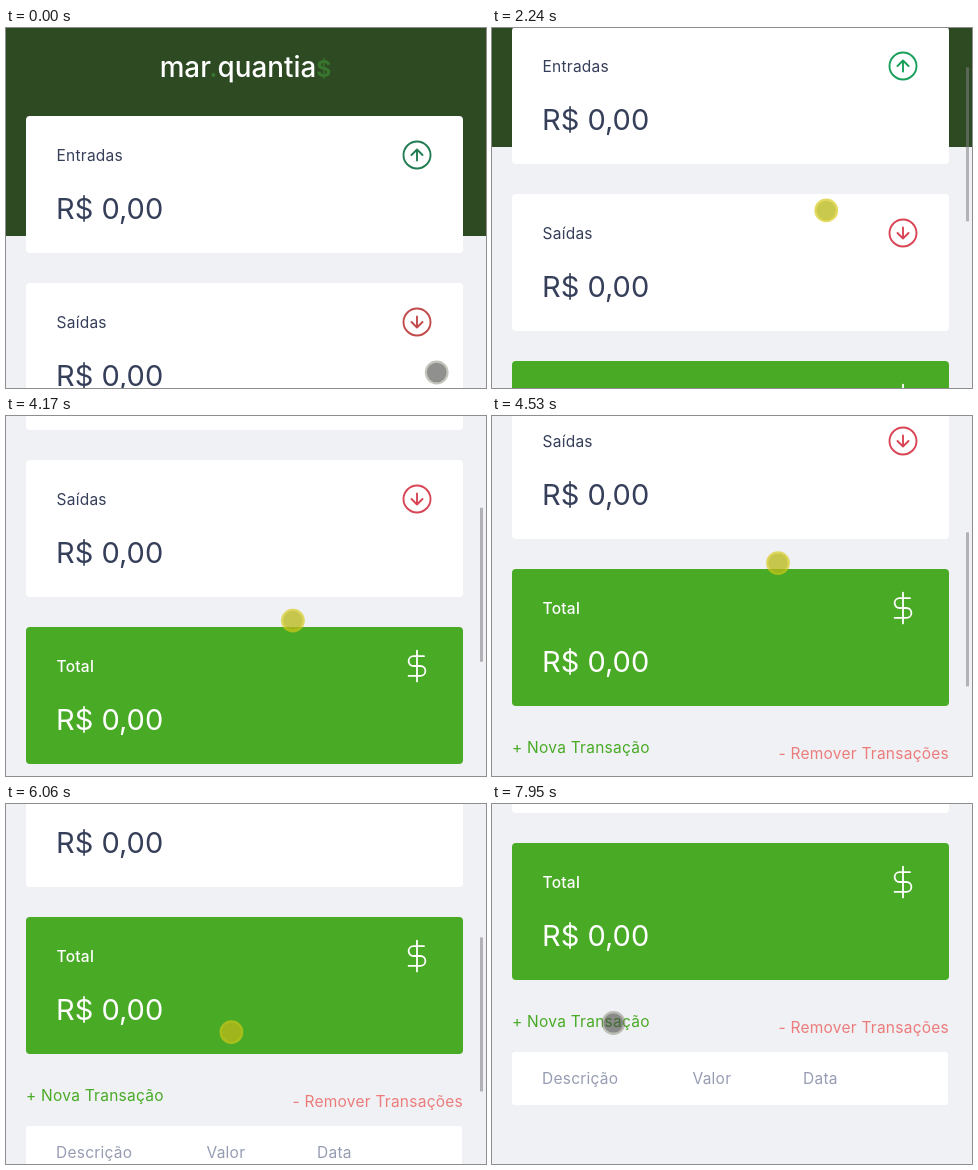
Recreate the animation shown at these times as an HTML page. Size 480 by 360 pixels, loop 8000 ms.

```html
<!DOCTYPE html>
<html lang="pt-BR">
<head>
<meta charset="utf-8">
<style>
  html, body { margin: 0; height: 100%; overflow: hidden; }
  svg {
    display: block; width: 480px; height: 360px; background: #f0f1f4;
    font: 15.5px Inter, sans-serif; letter-spacing: .25px;
    --brand: #419c2a; --in: #189f5a; --out: #d84656;
  }
  svg.muted { --brand: #38752e; --in: #217c52; --out: #c24a4a; }
  .dark { fill: #363f5a; }
  .white { fill: #fff; }
  .amount { font-size: 29px; letter-spacing: 0; }
  .logo { font-size: 27.8px; font-weight: 500; letter-spacing: 0; }
  .logo tspan { fill: var(--brand); }
  .coin { font-size: 23px; font-weight: 700; }
  .icon { fill: none; stroke-width: 1.9; stroke-linecap: round; stroke-linejoin: round; }
  .touch { fill: rgba(60,60,56,.57); }
  .ring { fill: none; stroke: rgba(125,125,108,.45); stroke-width: 2.4; }
  .down .touch { fill: rgba(185,185,25,.77); }
  .down .ring { stroke: rgba(212,200,24,.68); }
</style>
</head>
<body>
<svg id="stage" viewBox="0 0 480 360">
  <g id="page">
    <rect width="480" height="208" fill="#2d4a22"/>
    <text class="logo white" x="239.5" y="49" text-anchor="middle">mar<tspan>.</tspan>quantia<tspan class="coin">$</tspan></text>

    <g transform="translate(20 88)">
      <rect class="white" width="437" height="137" rx="4"/>
      <text class="dark" x="30.5" y="44.5">Entradas</text>
      <text class="dark amount" x="30" y="103">R$ 0,00</text>
      <g class="icon" stroke="var(--in)" transform="translate(391 39)">
        <circle r="13.5"/><path d="M0 5.5V-5.5M-5.5 0L0-5.5L5.5 0"/>
      </g>
    </g>

    <g transform="translate(20 255)">
      <rect class="white" width="437" height="137" rx="4"/>
      <text class="dark" x="30.5" y="44.5">Saídas</text>
      <text class="dark amount" x="30" y="103">R$ 0,00</text>
      <g class="icon" stroke="var(--out)" transform="translate(391 39)">
        <circle r="13.5"/><path d="M0-5.5V5.5M-5.5 0L0 5.5L5.5 0"/>
      </g>
    </g>

    <g transform="translate(20 422)">
      <rect width="437" height="137" rx="4" fill="#49aa26"/>
      <text class="white" x="30.5" y="44.5" font-weight="500">Total</text>
      <text class="white amount" x="30" y="103">R$ 0,00</text>
      <path class="icon" stroke="#fff" style="stroke-width:1.3" transform="translate(374.2 22.2) scale(1.4)"
        d="M12 1V23M17 5H9.5a3.5 3.5 0 0 0 0 7h5a3.5 3.5 0 0 1 0 7H6"/>
    </g>

    <text x="20" y="606" fill="#49aa26">+ Nova Transação</text>
    <text x="457" y="612" fill="#ec7c7c" text-anchor="end">- Remover Transações</text>
    <rect class="white" x="20" y="631" width="436" height="53" rx="3"/>
    <g fill="#969cb3">
      <text x="50" y="663">Descrição</text>
      <text x="200.5" y="663">Valor</text>
      <text x="311" y="663">Data</text>
    </g>
  </g>
  <rect id="thumb" x="474" width="3" height="154" fill="#808084" fill-opacity=".55"/>
  <g id="cursor">
    <circle class="touch" r="9.8"/>
    <circle class="ring" r="10.7"/>
  </g>
</svg>
<script>
  const LOOP = 8000;
  const SLOP = 13;   // finger travel before the page starts to scroll
  const [stage, page, thumb, cursor] =
    ['stage', 'page', 'thumb', 'cursor'].map(id => document.getElementById(id));

  const glide = (start, end, x, y) => ({ start, end, x, y });
  const drag = (...args) => ({ ...glide(...args), pressed: true });
  const moves = [
    glide(20, 21, 374, 304),
    glide(540, 890, 335, 284),
    drag(1120, 2780, 334, 149),
    glide(2790, 3490, 288.5, 307),
    drag(3630, 4540, 286, 147),
    glide(4560, 5240, 217, 247),
    glide(5260, 5410, 225, 281),
    drag(5750, 6450, 226, 154),
    glide(6480, 7210, 216, 246),
    glide(7230, 7650, 140, 203),
    glide(7650, 7950, 121.5, 219)
  ];

  const clamp = v => Math.max(0, Math.min(1, v));
  const ease = u => u * u * (3 - 2 * u);

  // Follow the moves up to time t; a drag scrolls the page by the finger's travel.
  function pose(t) {
    let x = 430.7, y = 344.5, scroll = 0, down = false, bar = 0;
    for (const m of moves) {
      if (t < m.start) break;
      const u = clamp((t - m.start) / (m.end - m.start)), e = ease(u);
      const nextY = y + (m.y - y) * e;
      if (m.pressed) {
        const travel = Math.max(0, y - SLOP - nextY);
        scroll += travel;
        down = u < 1;
        bar = travel ? clamp((m.end + 500 - t) / 250) : 0;
      }
      x += (m.x - x) * e;
      y = nextY;
    }
    return { x, y, scroll, down, bar };
  }

  function draw(now) {
    const t = now % LOOP;
    const { x, y, scroll, down, bar } = pose(t);
    stage.classList.toggle('muted', t < 1080);
    page.setAttribute('transform', `translate(0 ${-Math.round(scroll)})`);
    thumb.setAttribute('y', 1.5 + scroll * .427);
    thumb.setAttribute('opacity', bar);
    cursor.setAttribute('transform', `translate(${x} ${y})`);
    cursor.classList.toggle('down', down);
  }

  const start = performance.now();
  function tick() {
    draw(performance.now() - start);
    requestAnimationFrame(tick);
  }
  tick();
</script>
</body>
</html>
```
